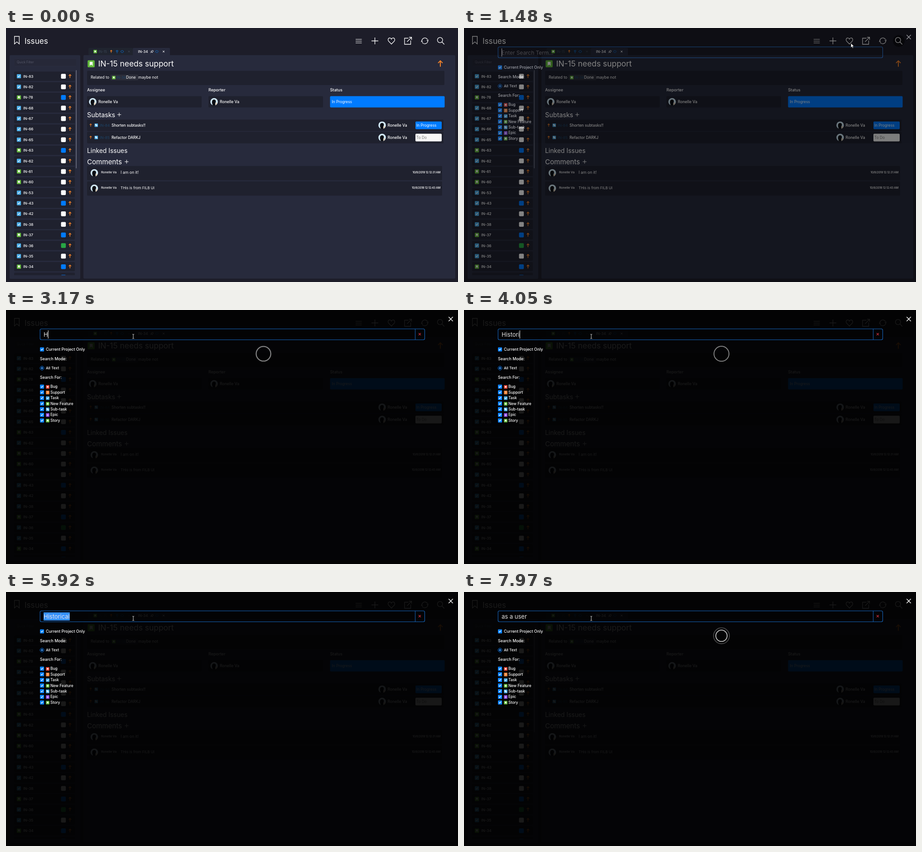
Recreate the animation shown at these times as an HTML page. Size 998 by 561 pixels, loop 8000 ms.

```html
<!DOCTYPE html>
<html lang="en">
<head>
<meta charset="utf-8">
<title>Issues</title>
<style>
  html, body { margin: 0; width: 100%; height: 100%; overflow: hidden; background: #1d1d29; }
  svg { display: block; width: 998px; height: 561px; }
  text { font-family: Inter, "Open Sans", sans-serif; white-space: pre; }
</style>
</head>
<body>
<svg id="stage" viewBox="0 0 998 561" xmlns="http://www.w3.org/2000/svg"></svg>
<script>
const LOOP = 8000, BLINK = 510, PULSE = 1600;
const PANEL = '#272a3c', CELL = '#1f212e', BLUE = '#007bff', GREEN = '#63ba3c',
      SKY = '#4bade8', ORANGE = '#f5832a', WHITE = '#fff', LINK = '#1d4468';
const PERSON = 'Ronelle Va';

// Drawing helpers
const rect = (x, y, w, h, fill, r = 2, more = '') =>
  `<rect x="${x}" y="${y}" width="${w}" height="${h}" rx="${r}" fill="${fill}" ${more}/>`;
const text = (x, y, size, str, fill = WHITE, weight = 400, more = '') =>
  `<text x="${x}" y="${y}" font-size="${size}" fill="${fill}" font-weight="${weight}" ${more}>${str}</text>`;
const line = (d, color = WHITE, width = 1, more = '') =>
  `<path d="${d}" fill="none" stroke="${color}" stroke-width="${width}" ${more}/>`;
const circle = (x, y, r, fill, more = '') =>
  `<circle cx="${x}" cy="${y}" r="${r}" fill="${fill}" ${more}/>`;
const cross = (x, y, r, color, width) =>
  line(`M${x - r} ${y - r}l${2 * r} ${2 * r}m0 ${-2 * r}l${-2 * r} ${2 * r}`, color, width);
const plus = (x, y, r, color = WHITE, width = 1) =>
  line(`M${x - r} ${y}h${2 * r}M${x} ${y - r}v${2 * r}`, color, width);
const upArrow = (x, y, s, width) =>
  line(`M${x} ${y + s}v${-2 * s}m${-s * .75} ${s * .75}l${s * .75} ${-s * .75}l${s * .75} ${s * .75}`, ORANGE, width);

const tick = (x, y, s, width = 1.2) =>
  line(`M${x - s * .26} ${y}l${s * .18} ${s * .18}l${s * .34} ${-s * .36}`, WHITE, width);
const ribbon = (x, y, s) =>
  `<path d="M${x - s * .21} ${y - s * .28}h${s * .42}v${s * .58}l${-s * .21} ${-s * .2}l${-s * .21} ${s * .2}z" fill="#fff"/>`;

// Issue type glyphs, centred on x, y
const glyphs = {
  bug: ['#e5493a', (x, y, s) => circle(x, y, s * .23, WHITE)],
  support: ['#e97f33', (x, y, s) => text(x, y + s * .3, s * .85, '?', WHITE, 600, 'text-anchor="middle"')],
  task: [SKY, (x, y, s) => tick(x, y, s)],
  feature: [GREEN, (x, y, s) => plus(x, y, s * .3, WHITE, 1.4)],
  subtask: [SKY, (x, y, s) => rect(x - s * .3, y - s * .3, s * .38, s * .38, WHITE, .3) +
    rect(x - s * .1, y - s * .1, s * .4, s * .4, '#d5ecfa', .3)],
  epic: ['#904ee2', (x, y, s) => line(`M${x + .7} ${y - s * .3}l-1.8 2.6h2.2l-1.8 2.6`, WHITE, 1)],
  story: [GREEN, ribbon]
};
const glyph = (type, x, y, s) => {
  const [color, mark] = glyphs[type];
  return rect(x - s / 2, y - s / 2, s, s, color, s * .12) + mark(x, y, s);
};

const avatar = (x, y) => circle(x, y, 8.3, '#cfe6f3') +
  `<path d="M${x - 3} ${y + 7.7}c-1-4-2-5-1.600-8c.3-3 2-4.600 4.400-4.600c3 0 4.400 2.200 4 4.800c-.3 2-1.500 2.600-1.300 4.600l.3 3.200q-3 1-5.800 0z" fill="#0b0d12"/>` +
  `<path d="M${x + 4} ${y + 1.500}l2.500 1l-2 4.500l-1.600.5z" fill="#e9c9a4"/>`;
const pin = (x, y, color) => line(`M${x - 3} ${y + 3}l2.500-2.500m-1.500-1l3 3l.5-1.500l2-2l-2-2l-2 2z`, color, 1);
const diamond = (x, y) => line(`M${x - 3.500} ${y}l2.200-2.200h2.600l2.200 2.200l-2.200 2.200h-2.600z`, '#0d63b8', 1);

const header = () =>
  line('M18.700 18.500h10.600v16.700l-5.300-4.700l-5.300 4.700z', WHITE, 1.3) +
  text(41, 34.500, 17.1, 'Issues') +
  line('M772 25h13.500m-13.500 4h13.500m-13.500 4h13.500', WHITE, 1.2) +
  plus(814.5, 28.5, 7.5, WHITE, 1.3) +
  line('M851 35.500l-6.300-6.500c-2-2.200-1.300-6.500 2-7c2.200-.3 3.500 1 4.300 2.600c.8-1.600 2.100-2.900 4.300-2.600c3.300.5 4 4.800 2 7z', WHITE, 1.3) +
  line('M888.500 22.500h-8.500v13.500h13.500v-8.500M885.500 30.500l10-10m-5.500 0h5.500v5.500', WHITE, 1.3) +
  line('M918.300 30.500a6.700 6.700 0 0 1 12.500-4.700M931.300 27a6.700 6.700 0 0 1-12.400 4.500', WHITE, 1.3) +
  line('M929 27.300l2.500 1l1-2.500M916.600 30.500l1.200-1.800l2.200 1.200', WHITE, 1.1) +
  circle(960, 28.5, 13, '#0e0e15', 'id="hover" opacity="0"') +
  circle(958.3, 26.6, 5.8, 'none', 'stroke="#fff" stroke-width="1.3"') +
  line('M962.500 30.800l5.200 5.400', WHITE, 1.3);

const tabs = () =>
  rect(182, 44, 98, 17, '#20242f') + rect(280, 44, 82, 17, PANEL) +
  glyph('story', 197, 52, 7.5) + text(204.5, 55, 7.4, 'IN-15', '#3a4656') +
  upArrow(232.3, 52, 2.8, 1.2) + line('M243.500 49.500h3.500v2.500h-3.500zm1.700 2.500v4', '#0d63b8', 1) +
  diamond(256.5, 52) + cross(271.5, 52, 1.8, '#454c5c', .9) +
  text(291.5, 55, 7.9, 'IN-34', WHITE, 500) + pin(322, 52, WHITE) +
  diamond(333, 52) + cross(348, 52, 2, WHITE, .9);

// number, type (t task, s story), status (w, b, g)
const issues = ('83tw 82tw 78sb 68tw 67tw 66tw 65tw 63sb 62tw 61sw 60sw 53tw 43tb 42tw ' +
  '38tw 37sb 36tg 35tw 34sb 33tb').split(' ');
const statusColor = { w: WHITE, b: BLUE, g: '#28a745' };

const sidebar = () => rect(8, 60, 156, 494, PANEL) +
  rect(18, 67.5, 138, 16.5, '#262838', 2, 'stroke="#2c2f40" stroke-width=".7"') +
  text(24, 78, 7, 'Quick Filter', '#565869') +
  '<clipPath id="list"><path d="M8 92h150v454H8z"/></clipPath><g clip-path="url(#list)">' +
  issues.map((issue, i) => {
    const y = 106.5 + 23.37 * i;
    return rect(18, y - 10.2, 134, 20.4, CELL) +
      glyph(issue[2] === 't' ? 'task' : 'story', 28.5, y, 9.2) +
      text(38, y + 3.1, 8.2, 'IN-' + issue.slice(0, 2), WHITE, 500) +
      rect(121.5, y - 5.2, 10.6, 10.6, statusColor[issue[3]]) +
      upArrow(141.3, y, 3.7, 1.4);
  }).join('') + '</g>' + rect(154.3, 93, 1.7, 217, '#696c7c', .8);

const field = (x, label) => text(x, 139.8, 9, label, WHITE, 500) +
  rect(x, 150.5, 253, 25, CELL) + avatar(x + 12.5, 163) +
  text(x + 25, 165.6, 8.6, PERSON, WHITE, 500);

const subtask = (y, id, title, chip, chipText, status) =>
  rect(179, y - 12.5, 787, 25.5, CELL) + upArrow(187, y, 3, 1.1) +
  glyph('subtask', 199.3, y, 7.5) + text(207, y + 2.8, 8, id, LINK) +
  text(233, y + 2.8, 8.4, title, WHITE, 500) + avatar(830.5, y) +
  text(842.5, y + 2.8, 8.6, PERSON, WHITE, 500) +
  rect(904, y - 8.3, 58, 17, chip) + text(906, y + 3, 8.3, status, chipText);

const comment = (y, body, size, stamp) =>
  rect(179, y - 15.3, 784, 31.500, CELL) + avatar(195, y) +
  text(210, y + 1.3, 6.8, PERSON, WHITE, 500) + text(253, y + 1.6, size, body) +
  text(959, y + 1.2, 6.4, stamp, WHITE, 500, 'text-anchor="end" letter-spacing="-.3"');

const detail = () => rect(171, 60, 821, 493.5, PANEL) +
  glyph('story', 188, 79, 15.5) + text(203.5, 85, 17.4, 'IN-15 needs support') +
  upArrow(959, 79, 6.6, 2) +
  rect(179, 94.5, 789, 31.5, CELL) + text(187, 111.800, 8.7, 'Related to') +
  rect(230.500, 103, 61.5, 12.5, '#2c2e3a') + glyph('story', 238, 109.5, 7.5) +
  text(244, 112, 7.6, 'IN-34', LINK) + text(265, 111.8, 8.7, 'Done') +
  text(292, 111.8, 8.8, 'maybe not') +
  field(179, 'Assignee') + field(447, 'Reporter') +
  text(715.5, 139.8, 9, 'Status', WHITE, 500) + rect(715.5, 150.5, 253, 25, BLUE) +
  text(719.5, 166, 8.3, 'In Progress') +
  text(179, 197, 14.3, 'Subtasks') + plus(250, 191.3, 4.2) +
  subtask(214.700, 'IN-84', 'Shorten subtasks!!', BLUE, WHITE, 'In Progress') +
  subtask(241.800, 'IN-85', 'Refactor DARKJ', '#f6f6f6', '#777', 'To Do') +
  text(179, 276, 13.9, 'Linked Issues') +
  text(179, 301, 15.1, 'Comments') + plus(266.3, 295.3, 4.2) +
  comment(320, 'I am on it!', 8.7, '10/8/2018 12:12:31 AM') +
  comment(354, 'THis is from FILB UI', 8, '10/8/2018 12:12:43 AM');

const checkbox = y => rect(75, y - 4.5, 9, 9, '#0a84ff', 1.2) + tick(79.5, y, 9, 1.3);
const kinds = [['bug', 'Bug'], ['support', 'Support'], ['task', 'Task'], ['feature', 'New Feature'],
  ['subtask', 'Sub-task'], ['epic', 'Epic'], ['story', 'Story']];

const overlay = () => '<g id="overlay" opacity="0">' +
  '<path d="M0 0h998v561H0z" fill="#000" fill-opacity=".9"/>' +
  cross(982, 20, 4.7, WHITE, 1.4) +
  rect(75.2, 41.800, 849.3, 24, 'none', 3, 'stroke="#1667c0" stroke-width="1.1"') +
  rect(83, 45, 58, 18, '#3390ff', 0, 'id="selection"') +
  text(83, 58.5, 11.9, 'Enter Search Term...', '#6c6c6c', 400, 'id="hint"') +
  text(83, 58.500, 13, '', '#e4e4e4', 400, 'id="query"') +
  rect(83, 45, 1, 18, WHITE, 0, 'id="caret"') +
  '<g id="clear">' + line('M903.500 42v24', '#1667c0') + cross(913.5, 53.3, 2.5, '#dc3545', 1.1) + '</g>' +
  checkbox(87) + text(88, 90, 8.9, 'Current Project Only', WHITE, 500) +
  text(75, 111, 8.9, 'Search Mode:', WHITE, 500) +
  circle(79.5, 128.3, 4.3, '#04101f', 'stroke="#0a78ea" stroke-width="1"') + circle(79.5, 128.3, 2, '#3d9bff') +
  text(88, 131.2, 8.2, 'All Text', WHITE, 500) +
  text(75, 152.2, 8.8, 'Search For:', WHITE, 500) +
  kinds.map(([type, name], i) => {
    const y = 169.3 + 12.43 * i;
    return checkbox(y) + glyph(type, 92, y + .5, 7.8) + text(98, y + 3, 8.4, name, WHITE, 500);
  }).join('') +
  '<g id="spinner" fill="none" stroke="#fff" stroke-width="1.8">' +
  '<circle cx="568.5" cy="96.7"/><circle cx="568.5" cy="96.7"/></g></g>';

const pointers =
  '<path id="arrow" d="M0 0v10l2.300-2.200l1.500 3.500l1.600-.7l-1.500-3.400h3.100z" fill="#fff" stroke="#000" stroke-width=".7"/>' +
  line('M-2-4.800q2 0 2 1.200v7.200q0 1.200 2 1.200M2-4.800q-2 0-2 1.200M0 3.600q0 1.200-2 1.200', '#d8d8d8', 1, 'id="beam"');

const $ = id => document.getElementById(id);
$('stage').innerHTML = rect(0, 0, 998, 561, '#1d1d29', 0) + header() + sidebar() + tabs() +
  detail() + overlay() + pointers;
const el = {};
for (const id of ['hover', 'overlay', 'selection', 'hint', 'query', 'caret', 'clear', 'spinner', 'arrow', 'beam'])
  el[id] = $(id);

// Motion helpers
const span = (t, from, to) => Math.min(1, Math.max(0, (t - from) / (to - from)));
const smooth = p => p * p * (3 - 2 * p);
const easeOut = p => 1 - (1 - p) ** 3;
const mix = (a, b, p) => a.map((v, i) => v + (b[i] - v) * p);
const show = (node, on) => node.setAttribute('visibility', on ? 'visible' : 'hidden');

// Typed strings with the time of each key
const typing = [
  { str: 'Historical', keys: [...'Historical'].map((_, i) => 3050 + 159 * i) },
  { str: 'as a user', keys: [6580, 6690, 6800, 6920, 7100, 7180, 7280, 7400, 7450] }
];

function typed(t) {
  const run = typing.filter(r => t >= r.keys[0]).pop();
  if (!run) return { str: '', last: 1750 };
  const n = run.keys.filter(k => k <= t).length;
  return { str: run.str.slice(0, n), last: run.keys[n - 1] };
}

function pointerAt(t) {
  const search = [963, 20], turn = [333, 98];
  if (t < 1370) return mix([376, 561], search, smooth(span(t, 330, 1080)));
  if (t < 1790) return mix(search, turn, smooth(span(t, 1370, 1790)));
  return mix(turn, [281, 58.3], easeOut(span(t, 1790, 2200)));
}

function drawSpinner(t) {
  show(el.spinner, (t >= 3080 && t < 5500) || t >= 6600);
  const start = t < 4418 ? 2498 : t < 6000 ? 4418 : 5986;
  [...el.spinner.children].forEach((ring, i) => {
    const p = (Math.max(0, t - start) / PULSE + i / 2) % 1;
    ring.setAttribute('r', (.88 * (1 + 19 * (1 - (1 - p) ** 4.300))).toFixed(2));
    ring.setAttribute('stroke-opacity', (1 - p).toFixed(3));
  });
}

function draw(t) {
  el.hover.setAttribute('opacity', t < 1700 ? span(t, 1240, 1320) : 0);
  el.overlay.setAttribute('opacity', smooth(span(t, 1270, 1670)));

  const { str, last } = typed(t);
  const selected = t >= 5920 && t < 6580;
  el.query.textContent = str;
  const width = str ? el.query.getComputedTextLength() : 0;
  show(el.hint, !str);
  show(el.clear, str);
  show(el.selection, selected);
  el.selection.setAttribute('width', width);
  el.caret.setAttribute('x', 83 + width);
  show(el.caret, !selected && Math.floor(Math.max(0, t - last) / BLINK) % 2 === 0);
  drawSpinner(t);

  const [x, y] = pointerAt(t);
  const overField = t > 1790 && y < 66;
  const place = `translate(${x.toFixed(1)} ${y.toFixed(1)})`;
  el.arrow.setAttribute('transform', place);
  el.beam.setAttribute('transform', place);
  show(el.arrow, t >= 330 && !overField);
  show(el.beam, overField);
}

function tickFrame() {
  draw(performance.now() % LOOP);
  requestAnimationFrame(tickFrame);
}
tickFrame();
</script>
</body>
</html>
```
